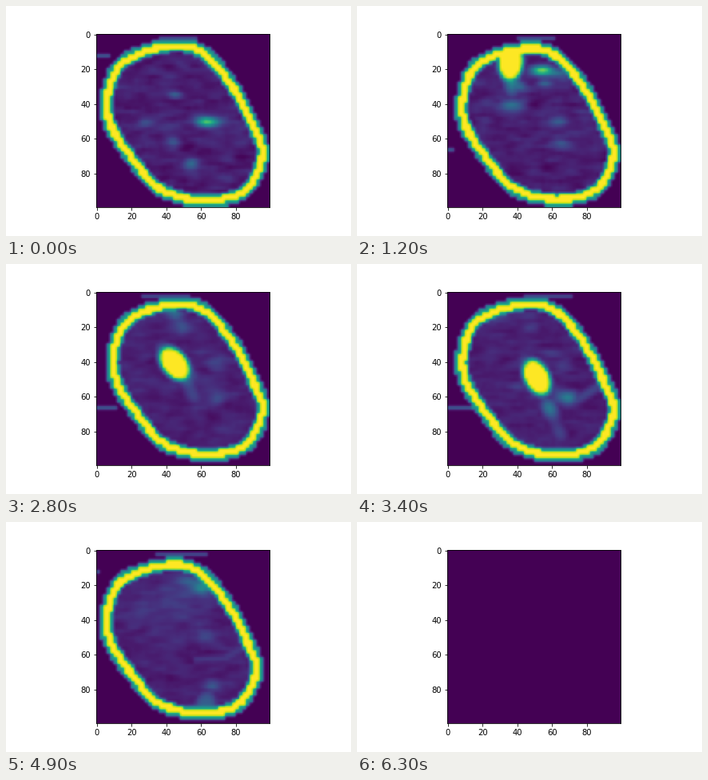
Write a matplotlib script that moves like this. It is 432 by 288 pixels and loops after 10000 ms.

```python
import numpy as np
import matplotlib.pyplot as plt
from matplotlib.animation import FuncAnimation
from matplotlib.path import Path

FRAMES, INTERVAL, ACTIVE = 100, 100, 63
SIZE, BLOCK = 100, 2
plt.rcParams.update({"font.family": "DejaVu Sans", "font.size": 10})

axis = np.arange(0, SIZE, BLOCK) + 0.5
X, Y = np.meshgrid(axis, axis)
CELLS = np.column_stack([X.ravel(), Y.ravel()])

OUTLINE = np.array([
    (41, 7), (60, 10.5), (77, 29), (89.5, 52.5), (95, 70), (84.5, 90),
    (61, 95.4), (37, 89.5), (22.5, 74.5), (8, 53), (6, 35), (15, 16)])

# Waypoints of the bright bolus on its way through the vessel
TIMES = (0, 12, 21, 34, 43, 50)
ROUTE = np.array([(41, -6), (36, 16), (37, 32), (51, 49), (64, 81), (62, 92)])


def pulse(t, peak, width):
    return np.exp(-((t - peak) / width) ** 2)


def blob(x, y, a, b, angle=0, power=1):
    c, s = np.cos(angle), np.sin(angle)
    u = ((X - x) * c + (Y - y) * s) / a
    v = ((Y - y) * c - (X - x) * s) / b
    return np.exp(-(u * u + v * v) ** power)


def streak(start, end, width):
    """Soft line between two points."""
    (x0, y0), (dx, dy) = start, np.subtract(end, start)
    along = np.clip(((X - x0) * dx + (Y - y0) * dy) / (dx * dx + dy * dy), 0, 1)
    gap = np.hypot(X - x0 - along * dx, Y - y0 - along * dy)
    return np.exp(-(gap / width) ** 2)


def smooth_loop(points, steps=20):
    """Closed Catmull-Rom curve through the points."""
    t = np.arange(steps)[:, None] / steps
    p0, p1, p2, p3 = (np.roll(points, k, axis=0)[:, None] for k in (1, 0, -1, -2))
    curve = .5 * (2 * p1 + (p2 - p0) * t + (2 * p0 - 5 * p1 + 4 * p2 - p3) * t**2
                  + (3 * p1 - p0 - 3 * p2 + p3) * t**3)
    return curve.reshape(-1, 2)


def soften(field):
    p = np.pad(field, 1, mode="edge")
    p = (p[:-2] + 4 * p[1:-1] + p[2:]) / 6
    return (p[:, :-2] + 4 * p[:, 1:-1] + p[:, 2:]) / 6


def grain(seed):
    field = np.random.default_rng(seed).normal(size=X.shape)
    field = sum(np.roll(field, k, 1) for k in (-1, 0, 1, 2))
    field = soften(field)
    return field / field.std()


def specks(seed):
    rng = np.random.default_rng(seed)
    return sum(rng.uniform(.12, .3)
               * blob(*rng.uniform((25, 12), (75, 82)), rng.uniform(4, 7), rng.uniform(2, 4))
               for _ in range(5))


def crossfade(make, t, period):
    k, mix = t // period, t % period / period
    return (1 - mix) * make(k) + mix * make(k + 1)


LOOP = smooth_loop(OUTLINE)
LOW, HIGH = LOOP.min(0), LOOP.max(0)
LOOP = (LOOP - LOW) / (HIGH - LOW)


def wall(t):
    """Pulsing ring in hard steps, and the mask of its inside."""
    turn = 2 * np.pi / 62
    low = np.array([7.2 + 2.1 * np.sin(turn * (t - 8)), 7.7 - .9 * np.cos(2 * turn * t)])
    high = np.array([95 - 3.5 * pulse(t, 49, 5),
                     95.4 - 6 * pulse(t, 21, 6) - 2.4 * pulse(t, 42, 12)])
    curve = low + LOOP * (high - low)
    gap = np.hypot(CELLS[:, :1] - curve[:, 0], CELLS[:, 1:] - curve[:, 1]).min(1)
    inside = Path(curve).contains_points(CELLS)
    rim = np.where(inside, 3.4, 4.3)
    ring = np.where(gap < 2.3, 1, np.where(gap < rim, .5, 0))
    return ring.reshape(X.shape), inside.reshape(X.shape)


def position(t):
    return np.array([np.interp(t, TIMES, column) for column in ROUTE.T])


def bolus(t):
    """Bright drop aligned with its travel, with a faint wake on both sides."""
    dx, dy = position(t + 4) - position(t - 4)
    angle = np.arctan2(dy, dx)
    fade = np.clip(min(t / 9, (50 - t) / 6), 0, 1)
    drop = 1.8 * blob(*position(t), 10.5, 6.8, angle, power=2)
    wake = sum(w * blob(*position(t + lag), 7, 5, angle)
               for lag, w in ((-5, .33), (5, .4), (9, .2)))
    return fade * np.maximum(drop, wake)


def flow(t):
    field = np.clip(.085 + .028 * crossfade(grain, t, 3), .01, 1)
    field += crossfade(lambda k: specks(k + 50), t, 12)
    field += .09 * pulse(t, 46, 8) * blob(43, 30, 22, 16)
    core = .48 * max(0, np.cos(2 * np.pi * t / 62)) + pulse(t, 21, 4)
    field += core * blob(62.5, 50.5, 6, 3) + .75 * pulse(t, 12, 5) * blob(54, 21, 6, 2.5)
    side = pulse(t, 21, 5) * streak((33, 42), (15, 60), 3.5)
    fork = np.maximum(streak((57, 63), (74, 62), 2.5), streak((74, 62), (90, 52), 3.5))
    return np.maximum.reduce([field, .4 * side, .45 * pulse(t, 41, 8) * fork, bolus(t)])


def bars(t):
    """Stray horizontal bars beyond the wall, renewed now and then."""
    rng = np.random.default_rng(200 + t // 4)
    start, row = rng.uniform(18, 45), rng.uniform(1, 4)
    left = rng.choice([13, 66])
    top = (abs(Y - row) < 1.3) & (X > start) & (X < start + rng.uniform(20, 34))
    side = (abs(Y - left) < 1.3) & (X < rng.uniform(0, 14))
    return .23 * top + .28 * side


def picture(t):
    if t >= ACTIVE:
        return np.zeros((SIZE, SIZE))
    ring, inside = wall(t)
    field = np.maximum.reduce([ring, np.where(inside, flow(t), 0), bars(t)])
    field = np.clip(field, 0, 1)
    return soften(field.repeat(BLOCK, axis=0).repeat(BLOCK, axis=1))


fig, ax = plt.subplots(figsize=(6, 4), dpi=72)
fig.subplots_adjust(left=.125, right=.9, bottom=.125, top=.88)
image = ax.imshow(picture(0), cmap="viridis", vmin=0, vmax=1)


def update(t):
    image.set_data(picture(t))
    return image,


anim = FuncAnimation(fig, update, frames=FRAMES, interval=INTERVAL,
                     repeat=True, repeat_delay=0)
plt.show()
```
